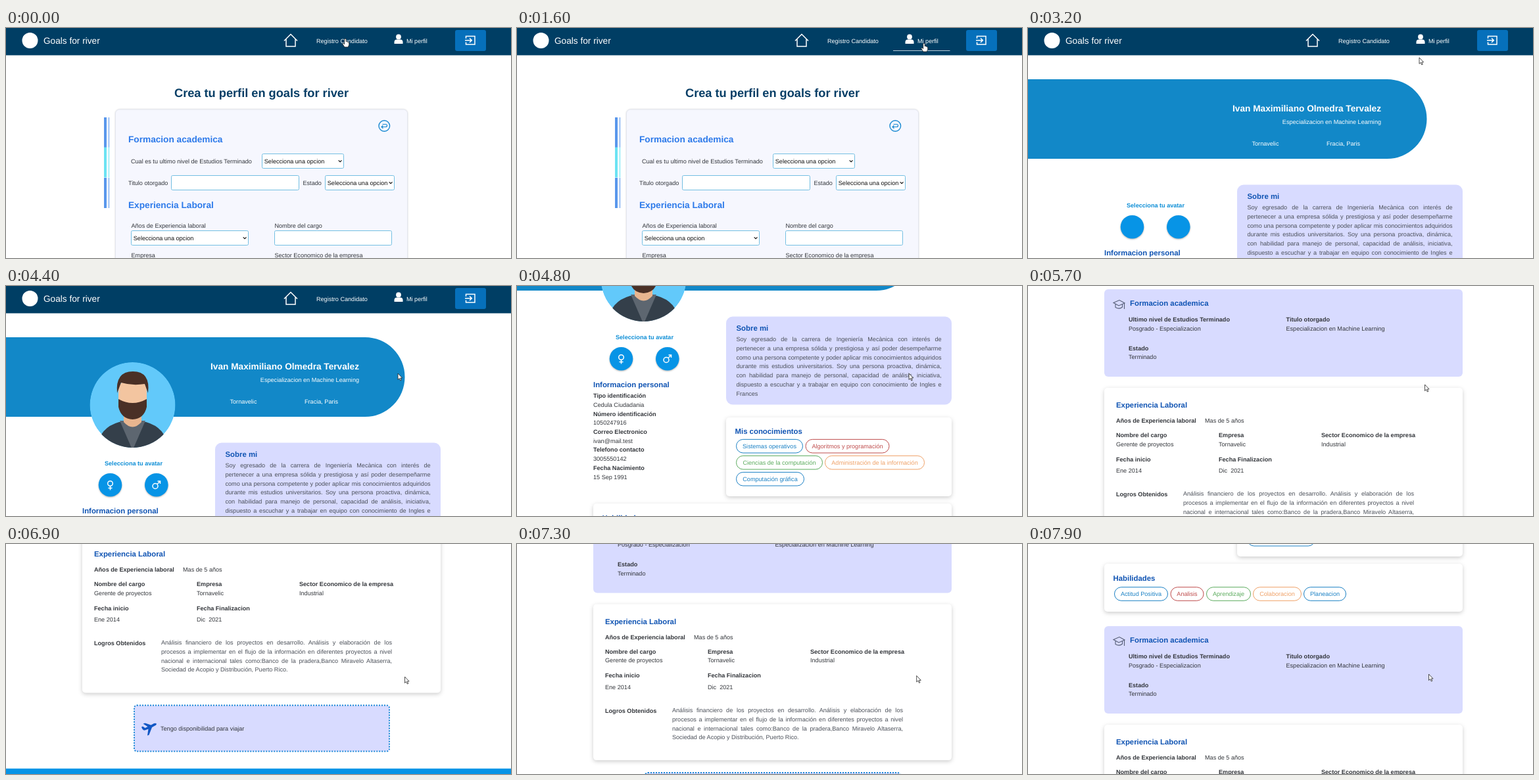
Animation of 768x350 px, one loop 8 s. Source, as an HTML page:

```html
<!DOCTYPE html>
<html lang="es">
<head>
<meta charset="utf-8">
<title>Perfil</title>
<style>
html, body { margin: 0; width: 100%; height: 100%; overflow: hidden; background: #fff; }
svg { display: block; width: 100%; height: 100%; }
text, .para { font-family: "Liberation Sans", Arial, sans-serif; text-rendering: geometricPrecision; }
text { white-space: pre; }
.para { margin: 0; font-size: 9.11px; line-height: 13.7px; color: #4b5059; }
.para div { white-space: nowrap; text-align: justify; text-align-last: justify; }
.para div.last { text-align-last: left; }
.card { fill: #fff; filter: drop-shadow(0 2px 3px rgba(0, 0, 0, .2)); }
.round { fill: #0794e6; filter: drop-shadow(0 1px 1px rgba(0, 0, 0, .3)); }
.field { fill: #fff; stroke: #74bfe2; }
.line { fill: none; stroke: #fff; stroke-width: 1.5; }
</style>
</head>
<body>
<svg id="stage" viewBox="0 0 768 350"></svg>
<script>
const LOOP = 8000, STEP = 100;
const BODY = 9.11, SUB = 11.39, HEAD = 13.66;
const INK = '#33363b', BLUE = '#1054b3', LILAC = '#d8dbff', SKY = '#0794e6';
const PILL = { blue: '#1a80c4', red: '#bf4c4c', green: '#5bab5d', orange: '#efa066' };

const text = (x, y, str, fill = INK, size = BODY, extra = '') =>
  `<text x="${x}" y="${y}" fill="${fill}" font-size="${size}" ${extra}>${str}</text>`;
const bold = (x, y, str, fill = INK, size = BODY, extra = '') =>
  text(x, y, str, fill, size, 'font-weight="bold" ' + extra);
const rect = (x, y, w, h, r, attrs) =>
  `<rect x="${x}" y="${y}" width="${w}" height="${h}" rx="${r}" ${attrs}/>`;
const path = (d, attrs) => `<path d="${d}" ${attrs}/>`;
const circle = (x, y, r, attrs) => `<circle cx="${x}" cy="${y}" r="${r}" ${attrs}/>`;
const input = (x, y, w) => rect(x, y, w, 22, 2, 'class="field"');
const select = (x, y, w) => input(x, y, w) + text(x + 3.3, y + 14, 'Selecciona una opcion', '#111') +
  path(`M${x + w - 7.8} ${y + 9.8}l2.4 2.4 2.4-2.4`, 'fill="none" stroke="#111" stroke-width="1.2"');
const pill = (x, cy, w, color, str) =>
  rect(x + .5, cy - 10.3, w - 1, 20.6, 10.3, `fill="#fff" stroke="${PILL[color]}"`) +
  text(x + w / 2, cy + 3.2, str, PILL[color], BODY, 'text-anchor="middle"');
const pair = (x, y, label, value, gap = 13.7) => bold(x, y, label) + text(x, y + gap, value);
const para = (x, y, w, lines) =>
  `<foreignObject x="${x}" y="${y - 10}" width="${w}" height="${lines.length * 13.7 + 2}"><div class="para">` +
  lines.map((s, i) => `<div${i === lines.length - 1 ? ' class="last"' : ''}>${s}</div>`).join('') +
  '</div></foreignObject>';

const nav = () =>
  rect(0, 0, 768, 41.5, 0, 'fill="#003e64"') +
  circle(36.5, 19, 12, 'fill="#fff"') +
  text(57, 24, 'Goals for river', '#fff', HEAD) +
  path('M423 19.5L433 9.5 443 19.5M426 17V28H440V17', 'class="line"') +
  text(472, 23.3, 'Registro Candidato', '#fff') +
  circle(597, 13.4, 3.9, 'fill="#fff"') +
  path('M590.5 24v-2.5q0-4 4-4h5q4 0 4 4V24z', 'fill="#fff"') +
  text(609, 23.3, 'Mi perfil', '#fff') +
  path('M572 34.5H658.5', 'id="under" stroke="#b9cbd8"') +
  rect(683, 3, 47, 32, 3, 'fill="#0670bb"') +
  path('M699.5 16V12.5H713V25H699.5V21.5M698 18.7H708M705 15.5L708.3 18.7 705 22', 'class="line"');

const form = () =>
  rect(0, 41.5, 768, 309, 0, 'fill="#fff"') +
  bold(388.5, 105, 'Crea tu perfil en goals for river', '#073e66', 18.22, 'text-anchor="middle"') +
  rect(166.5, 124, 444, 240, 6, 'fill="#f6f7fe" stroke="#e3e6ee" style="filter:drop-shadow(0 0 1px rgba(0,0,0,.15))"') +
  [[136, '#5a97ec'], [181.5, '#6be3f3'], [228, '#5a97ec']].map(([y, c]) =>
    rect(149, y, 4, 46, 0, `fill="${c}"`) + rect(156, y, 1, 46, 0, `fill="${c}"`)).join('') +
  circle(575.3, 149, 8.3, 'fill="none" stroke="#1c8bd2" stroke-width="1.4"') +
  path('M572 150.5H577.5Q579.5 150.5 579.5 148.5T577.5 146.5H572.5M573.5 148.2L571 150.5 573.5 152.8',
    'fill="none" stroke="#1c8bd2" stroke-width="1.2"') +
  bold(186, 173.5, 'Formacion academica', '#2d7aea', HEAD) +
  text(190, 205.5, 'Cual es tu ultimo nivel de Estudios Terminado') + select(389.5, 191.5, 124) +
  text(186, 239, 'Titulo otorgado') + input(251.5, 224.5, 194) +
  text(451.5, 239, 'Estado') + select(485.5, 224.5, 105) +
  bold(186, 273.5, 'Experiencia Laboral', '#2d7aea', HEAD) +
  text(190.5, 304, 'Años de Experiencia laboral') + select(190.5, 308.5, 178) +
  text(408.5, 304, 'Nombre del cargo') + input(408.5, 308.5, 178) +
  text(190.5, 349, 'Empresa') + text(408.5, 349, 'Sector Economico de la empresa');

const avatar = () =>
  '<clipPath id="disc">' + circle(192.5, 181, 65, '') + '</clipPath><g clip-path="url(#disc)">' +
  circle(192.5, 181, 65, 'fill="#62c9fa"') +
  path('M138 250Q140 216 172 207H213Q245 216 247 250z', 'fill="#343f4a"') +
  path('M173 205L192.5 250 212 205z', 'fill="#5d6670"') +
  path('M179 188H206V207Q192.5 222 179 207z', 'fill="#e8b58f"') +
  rect(171, 140, 43, 60, 20, 'fill="#f3c5a0"') +
  path('M171 172Q192.5 184 214 172V184Q210 202 192.5 203 175 202 171 184z', 'fill="#4a3026"') +
  path('M169 163Q166 130 193 130T216 163L211 149Q192 152 175 147z', 'fill="#4a3026"') +
  '</g>';

const personal = [
  ['Tipo identificación', 'Cedula Ciudadania'], ['Número identificación', '1050247916'],
  ['Correo Electronico', 'ivan@mail.test'], ['Telefono contacto', '3005550142'],
  ['Fecha Nacimiento', '15 Sep 1991']
];

const profile = () =>
  path('M0 78H546A60.5 60.5 0 0 1 546 199H0z', 'fill="#1288c8"') +
  bold(537, 127, 'Ivan Maximiliano Olmedra Tervalez', '#fff', HEAD, 'text-anchor="end"') +
  text(537, 145.5, 'Especializacion en Machine Learning', '#fff', BODY, 'text-anchor="end"') +
  text(340.5, 178.5, 'Tornavelic', '#fff') + text(454, 178.5, 'Fracia, Paris', '#fff') +
  bold(150, 273.3, 'Selecciona tu avatar', '#0d8ed6') +
  circle(158.5, 302.7, 17.8, 'class="round"') + circle(228.8, 302.7, 17.8, 'class="round"') +
  '<g id="pics">' + avatar() +
  circle(158.5, 300.5, 3.8, 'class="line"') + path('M158.5 304.3V310.5M155.5 307.5H161.5', 'class="line"') +
  circle(227, 304.5, 4, 'class="line"') + path('M230 301.5L234.5 297M230.5 297H234.5V301', 'class="line"') + '</g>' +
  bold(116, 346, 'Informacion personal', BLUE, SUB) +
  personal.map(([a, b], i) => pair(116, 362.2 + i * 27.4, a, b)).join('') +

  rect(318, 238.5, 343, 134, 10, `fill="${LILAC}"`) +
  bold(333.5, 260, 'Sobre mi', BLUE, SUB) +
  para(333.5, 277.3, 312, [
    'Soy egresado de la carrera de Ingeniería Mecànica con interés de',
    'pertenecer a una empresa sólida y prestigiosa y así poder desempeñarme',
    'como una persona competente y poder aplicar mis conocimientos adquiridos',
    'durante mis estudios universitarios. Soy una persona proactiva, dinámica,',
    'con habilidad para manejo de personal, capacidad de análisis, iniciativa,',
    'dispuesto a escuchar y a trabajar en equipo con conocimiento de Ingles e',
    'Frances']) +

  rect(318, 392, 343, 120, 5, 'class="card"') +
  bold(331.5, 417, 'Mis conocimientos', BLUE, SUB) +
  pill(333, 435.7, 102, 'blue', 'Sistemas operativos') +
  pill(438.5, 435.7, 128, 'red', 'Algoritmos y programación') +
  pill(333, 460.7, 132, 'green', 'Ciencias de la computación') +
  pill(468, 460.7, 152, 'orange', 'Administración de la información') +
  pill(333, 485.7, 104, 'blue', 'Computación gráfica') +

  rect(116, 523, 545, 73, 5, 'class="card"') +
  bold(129.5, 549, 'Habilidades', BLUE, SUB) +
  pill(131, 569, 82, 'blue', 'Actitud Positiva') +
  pill(216.5, 569, 51, 'red', 'Analisis') +
  pill(271, 569, 68, 'green', 'Aprendizaje') +
  pill(342, 569, 74, 'orange', 'Colaboracion') +
  pill(419, 569, 65, 'blue', 'Planeacion') +

  rect(116, 618, 545, 133, 6, `fill="${LILAC}"`) +
  path('M130 638.5L139 634.5 147 639 138 643zM133 640.5V645.5Q139 649 143.5 645V641M146.5 639.5V648',
    'fill="none" stroke="#555d75" stroke-width="1.1"') +
  bold(155, 643, 'Formacion academica', BLUE, SUB) +
  pair(153, 667, 'Ultimo nivel de Estudios Terminado', 'Posgrado - Especializacion') +
  pair(392.5, 667, 'Titulo otorgado', 'Especializacion en Machine Learning') +
  pair(153, 710.5, 'Estado', 'Terminado') +

  rect(116, 768, 545, 237.5, 5, 'class="card"') +
  bold(134, 798.3, 'Experiencia Laboral', BLUE, SUB) +
  bold(134, 821.3, 'Años de Experiencia laboral') + text(269, 821.3, 'Mas de 5 años') +
  pair(134, 843, 'Nombre del cargo', 'Gerente de proyectos') +
  pair(290, 843, 'Empresa', 'Tornavelic') +
  pair(446, 843, 'Sector Economico de la empresa', 'Industrial') +
  pair(134, 879.5, 'Fecha inicio', 'Ene 2014', 17.7) +
  pair(290, 879.5, 'Fecha Finalizacion', 'Dic  2021', 17.7) +
  bold(134, 933.2, 'Logros Obtenidos') +
  para(236, 933.2, 351, [
    'Análisis financiero de los proyectos en desarrollo. Análisis y elaboración de los',
    'procesos a implementar en el flujo de la información en diferentes proyectos a nivel',
    'nacional e internacional tales como:Banco de la pradera,Banco Miravelo Altaserra,',
    'Sociedad de Acopio y Distribución, Puerto Rico.']) +

  rect(195, 1024.5, 388, 70, 4, `fill="${LILAC}" stroke="#1a88d6" stroke-width="2" stroke-dasharray="2 2"`) +
  path('M206 1057.5L208 1056.5 211.5 1059 215.5 1057 208.5 1052.5 211.5 1051.5 220.5 1054.5 225 1052Q228.5 1051 229 1053 228.5 1055 225.5 1056L222 1058 217.5 1069.5 215 1070.5 216.5 1060.5 211 1062.5Q208 1063 206 1057.5z',
    'fill="#1157c4"') +
  text(235, 1062.5, 'Tengo disponibilidad para viajar') +
  rect(0, 1120.7, 768, 80, 0, `fill="${SKY}"`);

const cursor = () => '<g id="cursor" stroke="#222" stroke-width=".8" stroke-linejoin="round" fill="#fff">' +
  path('M0 0V9.5L2.2 7.5 3.8 11 5.3 10.3 3.7 7H6.6z', 'id="arrow"') +
  path('M-1.3 1Q0-.8 1.2 1V4.6Q2.5 4 3 5.2 4.2 4.6 4.6 5.8 5.8 5.6 5.7 7V9.5L4.3 13H-1.2L-4 8.5Q-4.3 6.8-2.8 7.2L-1.3 8.5z', 'id="hand"') +
  '</g>';

document.getElementById('stage').innerHTML =
  `<g id="page"><g id="profile">${profile()}</g><g id="form">${form()}</g>${nav()}</g>${cursor()}`;
const $ = id => document.getElementById(id);
const show = (id, on) => $(id).setAttribute('visibility', on ? 'visible' : 'hidden');

// Key rows: time, then values. Wheel rolls down the page, then back up.
const SWAP = 2000, PICS = 4300;
const SCROLL = [[4400, 0], [4800, 192], [5600, 585], [5700, 613], [5900, 626], [6200, 626],
  [6800, 779], [7000, 779], [7500, 608], [7600, 608], [7900, 493]];
const POINTER = [[0, 516, 16], [500, 540, 18], [600, 540, 18], [1600, 619, 23], [SWAP, 619, 23],
  [3200, 595, 45], [4200, 596, 133], [4800, 596, 133], [5700, 603.5, 150], [6200, 603.5, 150],
  [6900, 606.5, 202], [7900, 609.5, 198]];

function at(keys, t, col = 1) {
  const i = keys.findIndex(k => k[0] > t);
  if (i === 0) return keys[0][col];
  if (i < 0) return keys[keys.length - 1][col];
  const a = keys[i - 1], b = keys[i];
  return a[col] + (b[col] - a[col]) * (t - a[0]) / (b[0] - a[0]);
}

function draw(t) {
  const x = at(POINTER, t), y = at(POINTER, t, 2);
  const onLink = y < 35;
  $('page').setAttribute('transform', `translate(0 ${-at(SCROLL, t)})`);
  show('form', t < SWAP);
  show('profile', t >= SWAP);
  show('pics', t >= PICS);
  show('under', onLink && x > 572);
  show('hand', onLink);
  show('arrow', !onLink);
  $('cursor').setAttribute('transform', `translate(${x} ${y})`);
}

function tick() {
  const t = performance.now() % LOOP;
  draw(Math.floor(t / STEP) * STEP);
  requestAnimationFrame(tick);
}
tick();
</script>
</body>
</html>
```
